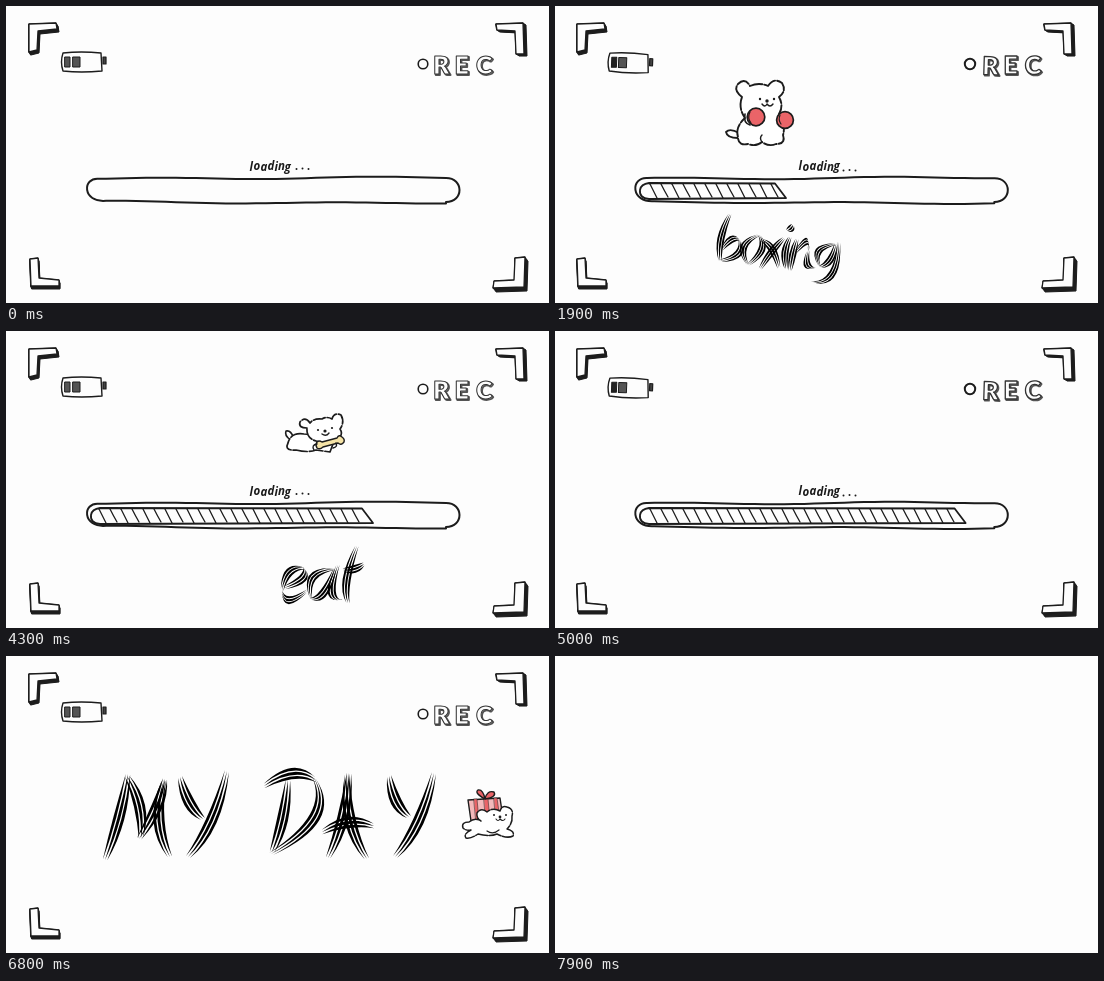
An HTML page with a canvas that plays this animation: 543x297 px, repeating every 8 s.

```html
<!DOCTYPE html>
<html lang="en">
<head>
<meta charset="utf-8">
<title>My day</title>
<style>
html, body { margin: 0; width: 100%; height: 100%; overflow: hidden; background: #fdfdfd; }
canvas { display: block; }
</style>
</head>
<body>
<canvas width="543" height="297" aria-label="loading, boxing, eat, my day"></canvas>
<script>
const ctx = document.querySelector('canvas').getContext('2d');
const INK = '#1c1c1c', PAPER = '#fdfdfd', RED = '#ea6468', PINK = '#f3b9bb', BONE = '#f5e3a6';
const LOOP = 8000, POSE = 1000 / 3;

// Brush strokes: start, control and end point of each
const WORDS = {
  boxing: `175 208 162 233 165 255, 165 255 192 251 184 233, 184 233 177 229 167 243,
    204 229 179 238 193 259, 204 229 215 243 193 259,
    207 234 219 239 224 262, 229 232 217 243 205 263,
    235 231 227 246 231 263, 242 233 237 248 235 265, 239 248 257 224 253 245, 253 245 248 264 260 262,
    281 238 254 241 265 261, 265 261 277 259 281 238, 284 236 283 281 257 276, 238 219 237 223 232 225`,
  eat: `278 257 305 248 298 237, 298 237 280 234 276 259, 276 259 277 279 301 260,
    329 238 297 239 305 268, 305 268 318 271 329 238, 332 234 318 270 335 269,
    351 215 335 253 342 272, 337 239 350 240 358 233`,
  myDay: `122 118 115 164 99 204, 121 120 139 149 135 182, 159 123 155 150 133 183, 158 124 145 167 164 201,
    174 121 181 151 197 163, 221 115 209 172 182 201,
    282 124 279 167 266 196, 258 130 289 108 310 124, 308 122 331 162 265 198,
    343 117 341 165 322 202, 341 118 338 170 361 203, 316 176 343 160 368 170,
    383 120 387 150 403 161, 428 117 416 172 389 201`
};

function ink(path, width = 1.6, fill, dash = []) {
  const shape = new Path2D(path);
  if (fill) { ctx.fillStyle = fill; ctx.fill(shape); }
  ctx.strokeStyle = INK;
  ctx.lineWidth = width;
  ctx.setLineDash(dash);
  if (width) ctx.stroke(shape);
  ctx.setLineDash([]);
}

function dot(x, y, r, fill = INK, line = 0) {
  ctx.beginPath();
  ctx.arc(x, y, r, 0, 7);
  ctx.fillStyle = fill;
  ctx.fill();
  if (line) { ctx.lineWidth = line; ctx.strokeStyle = INK; ctx.stroke(); }
}

function at(x, y, angle, draw) {
  ctx.save();
  ctx.translate(x, y);
  ctx.rotate(angle);
  draw();
  ctx.restore();
}

// Three tapered stripes side by side make one brush stroke
function brush(x0, y0, cx, cy, x1, y1, width) {
  const len = Math.hypot(x1 - x0, y1 - y0), nx = (y0 - y1) / len, ny = (x1 - x0) / len;
  ctx.fillStyle = '#000';
  for (const k of [-1, 0, 1]) {
    const tip = k * width * .2, mid = k * width * .55, half = width * .26;
    ctx.beginPath();
    ctx.moveTo(x0 + nx * tip, y0 + ny * tip);
    ctx.quadraticCurveTo(cx + nx * (mid + half), cy + ny * (mid + half), x1 + nx * tip, y1 + ny * tip);
    ctx.quadraticCurveTo(cx + nx * (mid - half), cy + ny * (mid - half), x0 + nx * tip, y0 + ny * tip);
    ctx.fill();
  }
}

function word(name, width) {
  for (const stroke of WORDS[name].split(',')) brush(...stroke.trim().split(/\s+/).map(Number), width);
}

function corner(x, y, path, dx, dy) {
  at(x, y, 0, () => {
    for (let k = 1; k > 0; k -= .2) {
      at(dx * k, dy * k, 0, () => ink(path, 1, '#333'));
    }
    ink(path, 1.3, PAPER);
  });
}

function viewfinder(b) {
  corner(22 - b, 17, 'M1 1 L28 0 L29 6 L10 8 L9 27 L1 29 Z', 2, 3);
  corner(490 - b, 17, 'M0 1 L27 0 L28 31 L20 31 L19 8 L1 7 Z', 3, 2);
  corner(24 - 2 * b, 252, 'M0 1 L8 0 L9 20 L29 22 L29 28 L1 28 Z', 1, 3);
  corner(487, 251, 'M22 1 L32 0 L31 30 L0 31 L1 24 L21 23 Z', 3, 4);

  at(55 - 2 * b, 46, b * .04, () => {
    ink('M2 1 Q20 -1 40 1 L41 19 Q20 21 2 19 Q-1 10 2 1 Z', 1.4, PAPER);
    ink('M42 5 h3 v7 h-3 Z', 1.2, '#444');
    ink('M4 5 h5 v10 h-5 Z', 1, b ? '#222' : '#555');
    ink(b ? 'M11 5 h8 v10 h-8 Z' : 'M12 5 h7 v10 h-7 Z', 1, '#555');
  });

  dot(417 - 2 * b, 58, b ? 5.2 : 4.8, PAPER, b ? 2 : 1.6);
  ctx.font = '900 25px Lato, sans-serif';
  ctx.lineJoin = 'round';
  [...'REC'].forEach((letter, i) => at(427 + i * 21.5, 68 + (i == 1 ? -.5 : .5) * b, b * .03 * (1 - i), () => {
    ctx.strokeStyle = '#555';
    ctx.lineWidth = 1.8;
    ctx.strokeText(letter, 1, 1);
    ctx.fillStyle = PAPER;
    ctx.fillText(letter, 0, 0);
    ctx.strokeStyle = '#333';
    ctx.lineWidth = b ? 1.3 : 1;
    ctx.strokeText(letter, 0, 0);
  }));
}

function barLevel(t) {
  const keys = [[300, 88], [1900, 231], [3200, 333], [4300, 367], [5600, 448]];
  for (let i = 1; i < keys.length; i++) {
    const [t0, x0] = keys[i - 1], [t1, x1] = keys[i];
    if (t <= t1) return x0 + (x1 - x0) * (t - t0) / (t1 - t0);
  }
  return 448;
}

function loadingBar(t, b) {
  const top = x => 172 + Math.sin(x / 33 + b) * .9 + Math.sin(x / 90) * .6;
  const low = x => 196.5 + Math.sin(x / 37 + 2 + b) * 1 + Math.sin(x / 70 + 3) * .8;
  let path = `M93 ${top(93)}`;
  for (let x = 100; x <= 440; x += 10) path += `L${x} ${top(x)}`;
  path += 'C458 172 458 196 440 196';
  for (let x = 440; x >= 93; x -= 10) path += `L${x} ${low(x)}`;
  path += `C76 197 76 171 93 ${top(93)}`;
  at(-b * .7, 0, 0, () => ink(path, 2));

  ctx.fillStyle = INK;
  ctx.font = 'italic 700 11.5px "Open Sans", sans-serif';
  [...'loading'].forEach((c, i) => ctx.fillText(c, 243.5 + [0, 4, 11, 18, 25, 28.5, 35][i], 165 - (i + b) % 2 * .7));
  for (let i = 0; i < 3; i++) dot(290.5 + i * 6 - b * 2, 163 + b * 1.5 - (i == 1 ? .5 : 0), 1);

  if (t < 300) return;
  const end = barLevel(t), left = 85;
  const start = Math.min(94, end - 2);
  const fill = `M${start} 177 L${Math.max(start, end - 11)} 177.5 L${end} 192 L${start} 193 Q${left - 1} 192 ${left} 184 Q${left + 1} 178 ${start} 177 Z`;
  ink(fill, 1.8);
  for (let x = 93 + b * 2; x < end - 13; x += 11) ink(`M${x} 178 q3 6 7 ${13 + x % 2}`, 1.3);
}

function boxingDog(b) {
  ink('M183 132 Q172 132 171 126 Q175 122 184 127', 1.8, '#fff');
  ink(`M187 91 Q178 84 183 78 Q190 71 195 80 Q204 76 213 80 Q219 71 227 77 Q232 85 224 91
    Q229 100 224 108 Q231 120 228 129 Q231 138 221 138 Q214 141 207 136 Q201 141 193 138
    Q183 140 183 131 Q180 121 190 112 Q183 102 187 91 Z`, 1.9, '#fff', [13, 2]);
  ink('M207 136 Q204 132 207 129 M207 98 q3 4 5 0 q3 4 6 0', 1.4);
  dot(205, 93, 1.2);
  dot(219, 93, 1.2);
  dot(212, 95, 1.7);
  const punch = b ? 0 : 3;
  ink(`M190 108 Q188 117 195 119`, 1.6);
  dot(201 + punch, 111 - punch, 8.8, RED, 1.7);
  dot(230 - punch, 114, 8.4, RED, 1.7);
  ink(`M${195 + punch} ${106 - punch} q-3 6 1 11 M${225 - punch} 109 q-2 5 1 9`, 1.2);
}

function eatingDog(b) {
  ink('M285 109 Q278 105 280 100 Q285 99 287 106', 1.6, '#fff');
  ink('M298 103 Q285 101 282 112 Q278 120 290 119 Q302 122 310 119 L324 121 L330 105 Z', 1.7, '#fff', [14, 2]);
  at(0, b * 1.5, b * .004, () => {
    ink(`M301 97 Q292 97 294 91 Q299 85 304 92 Q308 87 316 88 Q321 85 326 88
      Q328 81 335 84 Q339 91 334 98 Q338 104 331 108 Q322 114 310 110 Q300 107 301 97 Z`, 1.7, '#fff', [12, 2]);
  });
  if (b) {
    ink('M309 103 q3 -3 5 0 M324 101 q3 -3 5 0 M316 105 q3 3 6 -1', 1.3);
  } else {
    dot(312, 99, 1.1);
    dot(326, 97, 1.1);
    ink('M316 103 q4 3 7 -1', 1.4);
    dot(319, 100, 1.6);
  }
  ink(`M311 111 Q309 114 311 117 Q314 119 317 116 L332 112 Q335 115 338 111
    Q339 108 336 106 Q333 103 331 107 L316 111 Q313 109 311 111 Z`, 1.4, b ? '#fff' : BONE);
  ink('M308 119 q-3 -5 3 -6 M327 117 q5 -1 3 -5', 1.4);
}

// Centred on its own middle
function giftDog(b) {
  ink('M-20 -15 L12 -17 L15 3 L-17 6 Z', 1.4, PINK);
  ink('M-4 -16 L0 -16 L2 5 L-2 5 Z M6 -17 L9 -17 L12 4 L8 4 Z M-14 -16 L-11 -16 L-9 5 L-12 5 Z', .5, RED);
  ink('M-3 -16 Q-14 -22 -10 -25 Q-5 -26 -3 -16 Q-1 -25 6 -23 Q9 -18 -3 -16 Z', 1.4, RED);
  ink(`M-19 7 Q-27 7 -25 13 Q-22 16 -17 15 Q-25 19 -22 23 Q-17 24 -10 19 Q2 22 9 19
    Q19 24 25 21 Q27 16 19 14 Q25 8 24 1 Q26 -6 19 -8 Q14 -10 12 -4 Q5 -8 -1 -3
    Q-7 -8 -11 -2 Q-12 3 -7 6 Q-13 2 -19 7 Z`, 1.5, '#fff', [12, 1.5]);
  ink(b ? 'M1 16 q4 6 10 2' : 'M-1 16 q6 4 12 -1', 1.2);
  ink('M8 4 q2 3 4 0 q3 3 5 0', 1.1);
  dot(6, 0, 1);
  dot(18, 0, 1);
  dot(12, 2, 1.4);
}

function finale(t, b) {
  const x = -30 + (t - 5800) * .512;
  ctx.save();
  ctx.beginPath();
  ctx.rect(0, 0, Math.max(0, x), 297);
  ctx.clip();
  word('myDay', 11);
  ctx.restore();
  if (x < 580) at(x, 159, 0, () => giftDog(b));
}

function render(now) {
  const t = Math.floor(now % LOOP / 100) * 100;
  const b = Math.floor(t / POSE) % 2;
  ctx.fillStyle = PAPER;
  ctx.fillRect(0, 0, 543, 297);
  ctx.lineCap = ctx.lineJoin = 'round';
  if (t < 7900) {
    viewfinder(b);
    if (t < 5700) loadingBar(t, b);
    else finale(t, b);
    if (t >= 1200 && t < 2600) { boxingDog(b); word('boxing', 7); }
    if (t >= 2600 && t < 4500) { eatingDog(b); word('eat', 8); }
  }
}

const began = performance.now();
function tick() {
  render(performance.now() - began);
  requestAnimationFrame(tick);
}
tick();
</script>
</body>
</html>
```
